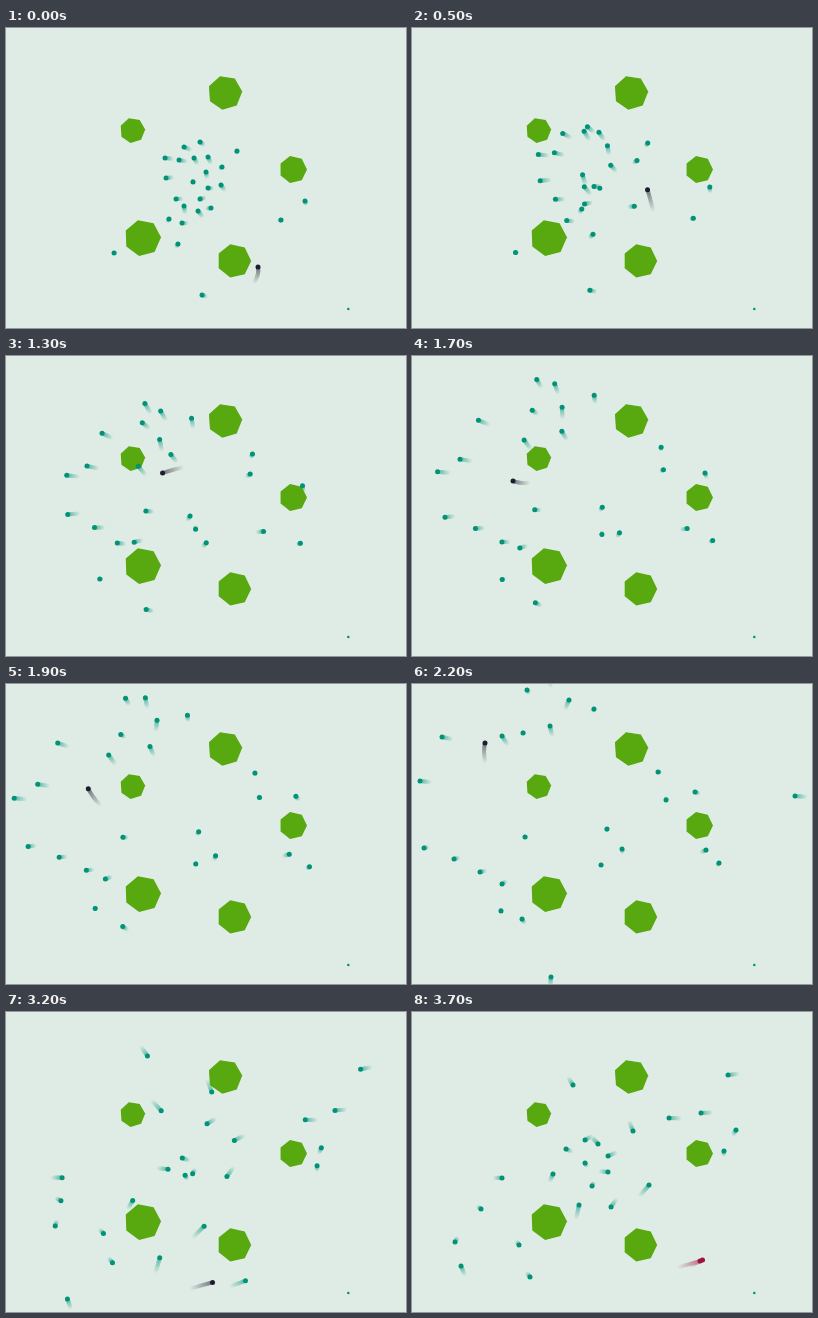
Animation, 400 px wide and 300 px high, one loop 3.8 s. Source, as an HTML page:

```html
<!DOCTYPE html>
<html lang="en">
<head>
<meta charset="utf-8">
<title>Flock and hunter</title>
<style>
  html, body { margin: 0; width: 100%; height: 100%; overflow: hidden; background: #dfece6; }
  svg { display: block; width: 100vw; height: 100vh; }
</style>
</head>
<body>
<svg id="stage" viewBox="0 0 400 300" preserveAspectRatio="none">
  <rect width="400" height="300" fill="#dfece6"/>
  <g id="trails"></g>
  <g id="rocks" fill="#58a810"></g>
  <g id="heads"></g>
  <circle cx="342.3" cy="281" r="1.3" fill="#009378"/>
</svg>
<script>
const W = 400, H = 300, LOOP = 3800, STEP = 100;
const TURN = 2200, END = 3700, CAUGHT = 3550;
const PAPER = [223, 236, 230], TEAL = [0, 147, 120], INK = [30, 28, 46], RED = [160, 18, 62];
const TAIL = 11, TAIL_MS = 125, CALM = 0.7;

const trails = document.getElementById('trails');
const rocks = document.getElementById('rocks');
const heads = document.getElementById('heads');
const movers = [];

function make(parent, tag, attrs) {
  const el = document.createElementNS('http://www.w3.org/2000/svg', tag);
  for (const k in attrs) el.setAttribute(k, attrs[k]);
  parent.appendChild(el);
  return el;
}

function rock(x, y, r, turn) {
  const pts = [];
  for (let i = 0; i < 7; i++) {
    const a = turn * Math.PI / 180 + i * 2 * Math.PI / 7;
    pts.push((x + r * Math.cos(a)).toFixed(2) + ',' + (y + r * Math.sin(a)).toFixed(2));
  }
  make(rocks, 'polygon', { points: pts.join(' ') });
}

const wrap = (v, size) => ((v % size) + size) % size;

const mix = (a, b, k) => 'rgb(' + a.map((v, i) => Math.round(v + (b[i] - v) * k)).join(',') + ')';

// Velocity at a key: parallel to its neighbours' chord, and calmer at the start.
function velocity(keys, i, axis) {
  const a = keys[Math.max(i - 1, 0)], b = keys[Math.min(i + 1, keys.length - 1)];
  return (b[axis] - a[axis]) / (b[0] - a[0]) * (i ? 1 : CALM);
}

// Smooth curve through keys of time, x, y on an unwrapped plane.
function place(keys, t) {
  let i = 0;
  while (i < keys.length - 2 && t > keys[i + 1][0]) i++;
  const p = keys[i], q = keys[i + 1], span = q[0] - p[0];
  const u = (t - p[0]) / span, ease = u * u * (3 - 2 * u);
  return [1, 2].map(axis => {
    const v = velocity(keys, i, axis), w = velocity(keys, i + 1, axis);
    if (u < 0) return p[axis] + v * (t - p[0]);
    return p[axis] + (q[axis] - p[axis]) * ease +
      span * u * (1 - u) * (v * (1 - u) - w * u);
  });
}

function add(color, caught, keys) {
  const dots = [];
  for (let i = TAIL; i > 0; i--) dots[i] = make(trails, 'circle', { r: 2.1 });
  dots[0] = make(heads, 'circle', { r: 2.5 });
  movers.push({ color, caught, keys, dots });
}

// A boid is its start, its turning point and its end.
function boid(x0, y0, x1, y1, x2, y2, caught = false) {
  add(TEAL, caught, [[0, x0, y0], [TURN, x1, y1], [END, x2, y2]]);
}

function draw(t) {
  for (const { color, caught, keys, dots } of movers) {
    dots.forEach((dot, i) => {
      const at = t - i * TAIL_MS / TAIL;
      const [x, y] = place(keys, at);
      const tint = caught && at >= CAUGHT ? RED : color;
      const strength = i ? 0.54 * (1 - i / (TAIL + 1)) : 1;
      dot.setAttribute('cx', wrap(x, W).toFixed(2));
      dot.setAttribute('cy', wrap(y, H).toFixed(2));
      dot.setAttribute('fill', mix(PAPER, tint, strength));
    });
  }
}

rock(219, 64.7, 17.3, -4);
rock(126.5, 102.5, 12.7, -4);
rock(287.1, 141.5, 13.9, 0);
rock(136.6, 210, 18.4, -2);
rock(228.1, 232.9, 17.1, 0);

boid(159, 130, -17, 112, -143, 106);
boid(178, 119, 30, 53, -84, 63);
boid(194, 114, 111, 49, 186, 132);
boid(173, 132, 8, 97, -111, 101);
boid(188, 130, 115, 6, 161, 73);
boid(202, 129, 139, -7, 237, -127);
boid(216, 139, 254, 116, 199, 195);
boid(231, 123, 246, 88, 173, 128);
boid(160, 150, 12, 164, 90, 166);
boid(187, 154, 189, 181, 173, 151);
boid(200, 144, 182, 25, 221, 119);
boid(202, 160, 113, 153, 196, 160);
boid(215, 157, 138, 42, 167, -107);
boid(170, 171, 42, 175, 69, 197);
boid(194, 171, 90, 200, 107, 233);
boid(192, 183, 90, 52, 49, -46);
boid(205, 180, 294, 166, 324, 118);
boid(163, 191, 195, 145, 180, 174);
boid(176, 195, 68, 188, 43, 230);
boid(172, 216, 210, 165, 154, 137);
boid(275, 192, 307, 179, 312, 139);
boid(299, 173, 283, 108, 196, 144);
boid(108, 225, 89, 227, 118, 265);
boid(196, 267, 110, 235, 141, 162);
boid(178, 178, 157, 16, 290.5, -52, true);

add(INK, true, [
  [-300, 238, 268], [0, 252, 239], [900, 209, 114], [1700, 101, 125],
  [TURN, 73, 59], [2700, 129, -2], [END, 288, -51]
]);

const start = performance.now();
function tick() {
  const t = (performance.now() - start) % LOOP;
  draw(Math.floor(t / STEP) * STEP);
  requestAnimationFrame(tick);
}
tick();
</script>
</body>
</html>
```
